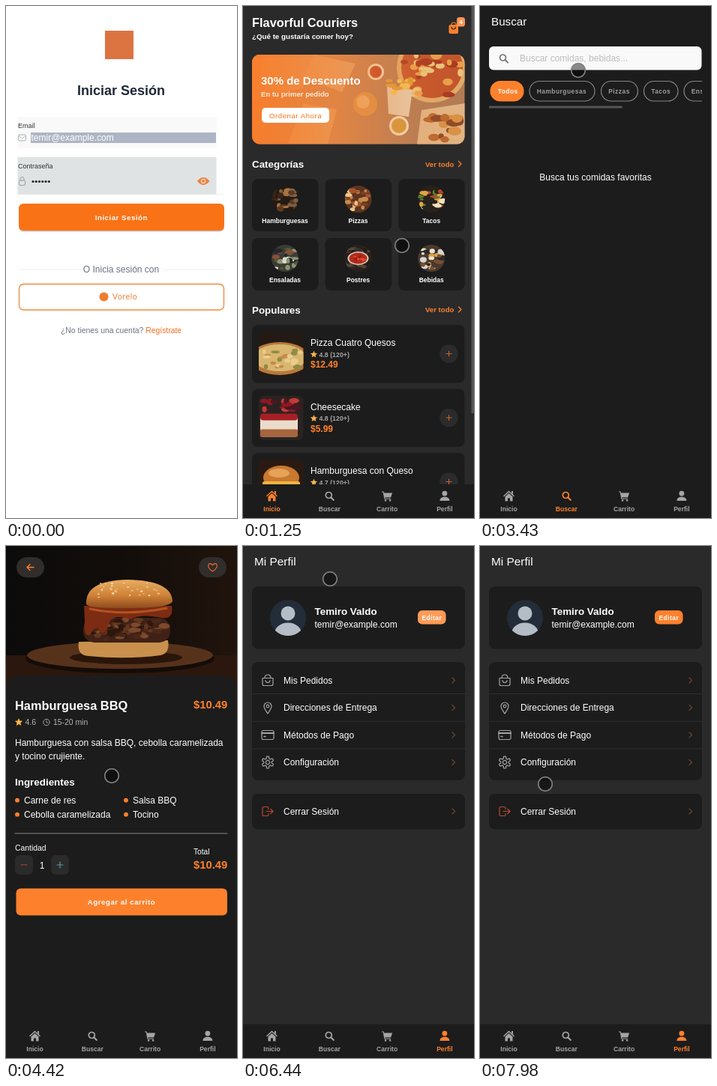
Write an HTML page that moves like this. It is 308 by 684 pixels and loops after 8000 ms.

```html
<!DOCTYPE html>
<html lang="es">
<head>
<meta charset="utf-8">
<title>Pedidos de comida</title>
<style>
  html, body { margin: 0; width: 100%; height: 100%; overflow: hidden; background: #fff; }
  svg { display: block; width: 100%; height: 100%; font-family: "Liberation Sans", Arial, sans-serif; }
  text { white-space: pre; }
</style>
</head>
<body>
<svg id="stage" viewBox="0 0 308 684"></svg>
<script>
const LOOP = 8000;
const ORANGE = '#fd812d', DARK = '#1c1c1c', PAGE = '#2a2a2a', MUTED = '#a5a5a5';
const BOLD = 'font-weight="700"', MID = 'text-anchor="middle"';
const EMAIL = 'temir@example.com';

// ---- drawing helpers ----
const text = (x, y, size, str, fill = '#fff', attrs = '') =>
  `<text x="${x}" y="${y}" font-size="${size}" fill="${fill}" ${attrs}>${str}</text>`;
const spaced = n => `letter-spacing="${n}"`;
const rect = (x, y, w, h, r, fill, attrs = '') =>
  `<rect x="${x}" y="${y}" width="${w}" height="${h}" rx="${r}" fill="${fill}" ${attrs}/>`;
const circle = (x, y, r, fill, attrs = '') => `<circle cx="${x}" cy="${y}" r="${r}" fill="${fill}" ${attrs}/>`;
const ellipse = (x, y, rx, ry, fill) => `<ellipse cx="${x}" cy="${y}" rx="${rx}" ry="${ry}" fill="${fill}"/>`;
const fillPath = (d, fill) => `<path d="${d}" fill="${fill}"/>`;
const line = (d, color, w = 1.2) =>
  `<path d="${d}" fill="none" stroke="${color}" stroke-width="${w}" stroke-linecap="round" stroke-linejoin="round"/>`;
const at = (x, y, body) => `<g transform="translate(${x} ${y})">${body}</g>`;
const chevron = (x, y, color) => line(`M${x - 2} ${y - 3.5}l3.5 3.5-3.5 3.5`, color);
const star = (x, y, r) => {
  const points = Array.from({ length: 10 }, (_, i) => {
    const a = i * Math.PI / 5, d = i % 2 ? r * .45 : r;
    return `${(x + d * Math.sin(a)).toFixed(1)},${(y - d * Math.cos(a)).toFixed(1)}`;
  });
  return `<polygon points="${points.join(' ')}" fill="#ffb347"/>`;
};

let clips = 0;
const clipped = (x, y, w, h, r, body) => {
  const id = `clip${clips++}`;
  return `<clipPath id="${id}">${rect(x, y, w, h, r, '#000')}</clipPath><g clip-path="url(#${id})">${body}</g>`;
};
const random = seed => () => (seed = (seed * 16807) % 2147483647) / 2147483647;
const blobs = (x, y, w, h, count, size, colors, seed) => {
  const rnd = random(seed * 7919);
  rnd();
  return Array.from({ length: count }, (_, i) =>
    ellipse(x + rnd() * w, y + rnd() * h, size * (.5 + rnd()), size * (.3 + rnd() * .6), colors[i % colors.length])).join('');
};

// ---- icons, centred on 0,0 ----
const magnifier = c => circle(-1, -1, 4, 'none', `stroke="${c}" stroke-width="1.7"`) + line('M2 2L5.5 5.5', c, 2);
const icons = {
  home: c => fillPath('M-7.5 0L0-7 7.5 0 6.5 1 0-5-6.5 1ZM-5 1L0-3.5 5 1V7H1.5V3H-1.5V7H-5ZM3.5-6.5H5.5V-2L3.5-4Z', c),
  search: magnifier,
  cart: c => fillPath('M-7-6H-4.5L-4-4H7L5 2H-3L-2.7 3.3H5V4.3H-3.7L-5.4-5H-7Z', c) + circle(-2, 6, 1.3, c) + circle(4, 6, 1.3, c),
  person: c => circle(0, -3.3, 3.4, c) + fillPath('M-6.5 6.5C-6.5-.5 6.5-.5 6.5 6.5Z', c),
  bag: c => line('M-7-3H7V5Q7 7 5 7H-5Q-7 7-7 5ZM-4-3C-4-9 4-9 4-3M-3 0C-3 4 3 4 3 0', c),
  pin: c => line('M0 8C-3 3-5 1-5-2A5 5 0 0 1 5-2C5 1 3 3 0 8Z', c) + circle(0, -2, 1.8, 'none', `stroke="${c}" stroke-width="1.2"`),
  card: c => rect(-8, -6, 16, 12, 2, 'none', `stroke="${c}" stroke-width="1.2"`) + line('M-8-2.5H8', c, 2) + line('M-5 2H-3', c, 1.6),
  gear: c => {
    const points = Array.from({ length: 64 }, (_, i) => {
      const a = i * Math.PI / 32, r = 6.6 + 1.4 * Math.tanh(3 * Math.cos(a * 6));
      return `${(r * Math.sin(a)).toFixed(1)} ${(r * Math.cos(a)).toFixed(1)}`;
    });
    return line(`M${points.join('L')}Z`, c) + circle(0, 0, 2.6, 'none', `stroke="${c}" stroke-width="1.2"`);
  },
  exit: c => line('M1-3V-4.5Q1-6 -.5-6H-5.5Q-7-6-7-4.5V4.5Q-7 6-5.5 6H-.5Q1 6 1 4.5V3M-2 0H7M4-3L7 0 4 3', c)
};

const tabs = [['home', 'Inicio'], ['search', 'Buscar'], ['cart', 'Carrito'], ['person', 'Perfil']];
const tabX = i => 38.5 + i * 76.8;
const tabBar = active => rect(0, 639, 308, 45, 0, DARK) + tabs.map(([icon, label], i) => {
  const color = i === active ? ORANGE : MUTED;
  return at(tabX(i), 654.5, icons[icon](color)) + text(tabX(i), 674.5, 8.6, label, color, `${BOLD} ${MID}`);
}).join('');

// ---- food pictures ----
const cake = (x, y) => rect(x, y, 60, 60, 0, '#2a2322') + rect(x + 2, y + 27, 50, 28, 3, '#eadccb') +
  rect(x + 2, y + 45, 50, 10, 2, '#a8643c') + rect(x + 2, y + 24, 50, 9, 4, '#a51f25') +
  blobs(x + 4, y + 5, 46, 18, 16, 5, ['#8e1822', '#c33b35', '#4b1720'], 5);
const pizza = (x, y) => rect(x, y, 60, 60, 0, '#241a15') + ellipse(x + 28, y + 36, 40, 22, '#b8793c') +
  ellipse(x + 28, y + 35, 35, 18, '#d9b66f') + blobs(x, y + 20, 56, 30, 22, 4, ['#e8cd8c', '#c58a49', '#8f8b45'], 9);
const burger = (x, y) => rect(x, y, 60, 60, 0, '#2b1a12') + ellipse(x + 30, y + 24, 24, 16, '#c9782f') +
  ellipse(x + 27, y + 18, 14, 6, '#e6a358') + rect(x + 5, y + 29, 50, 6, 3, '#f0b541') +
  rect(x + 5, y + 34, 50, 10, 4, '#4a2415') + rect(x + 7, y + 43, 46, 12, 5, '#bd7a38');

const foodCard = (y, picture, name, rating, price) =>
  rect(12, y, 283.5, 77.5, 8, DARK) + clipped(21, y + 9, 59.5, 59.5, 7, picture(21, y + 9)) +
  text(90, y + 28, 12, name) + star(94.5, y + 39.5, 5) +
  text(101.5, y + 42.5, 8.8, `${rating} (120+)`, MUTED, BOLD) + text(90, y + 57, 12, price, ORANGE, BOLD) +
  circle(274.5, y + 38.5, 12.3, '#2b2b2b') + line(`M271 ${y + 38.5}h7m-3.5-3.5v7`, '#c5672b', 1);

const category = ([name, ground, colors], i) => {
  const x = 12 + (i % 3) * 97.6, y = 231 + Math.floor(i / 3) * 79, cx = x + 44;
  return rect(x, y, 88.5, 70, 8, DARK) +
    clipped(cx - 18, y + 9, 36, 36, 18, rect(cx - 18, y + 9, 36, 36, 0, ground) +
      blobs(cx - 16, y + 14, 32, 27, 26, 4.2, colors, i + 3)) +
    text(cx, y + 59, 8.5, name, '#fff', `${BOLD} ${MID}`);
};

const heroPicture = () => rect(12, 65, 284, 120, 0, '#b27b55') +
  fillPath('M12 65H100L80 110 12 125Z', '#c99a6c') + fillPath('M95 65l55 12-18 38-52-20Z', '#d7a878') +
  fillPath('M80 130l45 8-12 46H60Z', '#d5a26c') +
  circle(252, 82, 47, '#dfab68') + circle(252, 82, 41, '#c2542b') +
  blobs(215, 65, 75, 55, 30, 6, ['#e7a04b', '#a63820', '#e9c67c'], 12) +
  fillPath('M192 108l34 4-5 36-27-4Z', '#e3ceb0') + blobs(193, 98, 32, 18, 14, 5, ['#f1c553', '#dc9c35'], 4) +
  circle(177, 88, 11, '#f2e3c7') + circle(177, 88, 8, '#b53a21') +
  circle(208, 160, 13, '#efe0c5') + circle(208, 160, 10, '#cf9a3c') +
  circle(163, 131, 16, '#d39146') + circle(160, 128, 9, '#e7b573') +
  fillPath('M238 139l58-9v55H232Z', '#e0b483') + blobs(245, 145, 45, 34, 16, 7, ['#ba672f', '#d89145', '#8d4926'], 8);

// ---- pages ----
const loginPage = () => rect(0, 0, 308, 684, 0, '#fff') +
  rect(132, 33, 38, 38, 0, '#dc7442') +
  text(153.5, 118.5, 18, 'Iniciar Sesión', '#1f2937', `${BOLD} ${MID}`) +
  rect(15.5, 148, 265.5, 42, 0, '#f9f9f9') + text(16, 163, 9, 'Email', '#333') +
  rect(16.5, 172, 10, 8, 1.5, 'none', 'stroke="#a9adb3"') + line('M17.5 174l4 3 4-3', '#a9adb3', .9) +
  rect(33, 169, 247, 14, 0, '#adb5c5') + text(33.5, 180, 12, EMAIL) +
  rect(15.5, 202, 265, 50, 0, '#f9f9f9') + rect(15.5, 202, 265, 50, 0, '#e0e3e3', 'id="fieldTint"') +
  line('M16 251.5H291', '#e8e8e8', .7) + text(16, 217, 9, 'Contraseña', '#333') +
  rect(17.5, 233, 8, 6.5, 1.5, 'none', 'stroke="#999da3"') + line('M19 233v-2a2.5 2.5 0 0 1 5 0v2', '#999da3', 1) +
  [0, 1, 2, 3, 4, 5].map(i => circle(36 + i * 4.25, 234.5, 1.6, '#222')).join('') +
  fillPath('M255 234Q263 224 271.500 234 263 244 255 234Z', '#f08138') +
  circle(263, 234, 3.2, '#e1e4e4') + circle(263, 234, 2, '#f08138') +
  rect(17, 265.5, 274, 36, 6, '#b9a89c', 'opacity=".7"') + rect(17, 264, 274, 36, 6, '#f97316') +
  text(153.8, 285.5, 9.6, 'Iniciar Sesión', '#fff', `${BOLD} ${MID} ${spaced(.55)}`) +
  line('M16 352H98M209 352H291', '#ececec', .8) + text(153.5, 355.5, 12, 'O Inicia sesión con', '#6b7280', MID) +
  rect(17.5, 371.5, 273, 34.5, 6, '#fff', 'stroke="#ef8a3e" stroke-width="1.3"') +
  circle(130.5, 388.5, 6, '#ef7b2c') + text(142, 391.5, 10.4, 'Vorelo', '#ef7b2c', spaced(.6)) +
  text(73, 437, 10.4, '¿No tienes una cuenta? <tspan fill="#f07020">Regístrate</tspan>', '#6b7280');

const sectionHead = (y, title) => text(12, y, 13.4, title, '#fff', BOLD) +
  text(243, y - 1.5, 9.6, 'Ver todo', ORANGE, BOLD) + chevron(289.5, y - 5, ORANGE);

const homePage = () => rect(0, 0, 308, 684, 0, PAGE) +
  text(12, 27.5, 16.4, 'Flavorful Couriers', '#fff', BOLD) +
  text(12, 44, 9.75, '¿Qué te gustaría comer hoy?', '#fff', BOLD) +
  rect(274.5, 25, 12.5, 12, 2, ORANGE) + line('M278 25c0-4 6-4 6 0', ORANGE) + line('M278 28c0 4 5.500 4 5.500 0', PAGE) +
  rect(285, 15, 11, 12.5, 3.5, '#ff9452') + text(290.5, 24, 8, '4', '#fff', `${BOLD} ${MID}`) +
  clipped(12, 65, 283.5, 119.5, 10, heroPicture() + rect(12, 65, 284, 120, 0, 'url(#heroTint)')) +
  text(24, 105, 15, '30% de Descuento', '#fff', BOLD) + text(24, 120.5, 9.6, 'En tu primer pedido', '#ffe9d8', BOLD) +
  rect(25, 136, 90, 20, 5, '#fff') + text(35, 149.5, 9.6, 'Ordenar Ahora', '#f97316', spaced(.55)) +
  sectionHead(216, 'Categorías') +
  [['Hamburguesas', '#241a14', ['#5c3a20', '#3a2417', '#a87442', '#7c6146']],
   ['Pizzas', '#5b3420', ['#c98a4c', '#7b4023', '#ecc88d', '#a5532c']],
   ['Tacos', '#27221c', ['#e0a644', '#f0e2bd', '#5d7a35', '#b64529', '#2a2018']],
   ['Ensaladas', '#3b3b36', ['#8b9671', '#dcd9cc', '#4c5a38', '#8a4f38', '#25282a']],
   ['Postres', '#2a211d', ['#37302c', '#57463a', '#221b18']],
   ['Bebidas', '#4a3a2e', ['#f0e4cf', '#d6a04a', '#7a4f30', '#d5d5d2', '#2d2826']]].map(category).join('') +
  ellipse(153.5, 337, 14, 9, '#d9cfc4') + ellipse(153.5, 337, 12, 7.500, '#b52a1a') +
  blobs(145, 333, 17, 8, 9, 2, ['#e0502c', '#8d1c14'], 6) +
  sectionHead(410.5, 'Populares') +
  foodCard(426, pizza, 'Pizza Cuatro Quesos', '4.8', '$12.49') +
  foodCard(511.500, cake, 'Cheesecake', '4.8', '$5.99') +
  foodCard(597, burger, 'Hamburguesa con Queso', '4.7', '$8.99') +
  rect(304.5, 0, 3.5, 544, 0, '#565656') + tabBar(0);

const chips = [['Todos', 14, 44], ['Hamburguesas', 66, 87], ['Pizzas', 161.500, 49], ['Tacos', 218.5, 45.5], ['Ensaladas', 272, 70]];
const searchPage = active => rect(0, 0, 308, 684, 0, DARK) + text(15, 26, 15.2, 'Buscar') +
  rect(12, 54, 283.5, 31.5, 6, '#f9f9f9') + at(31.5, 70, magnifier('#777')) +
  text(53, 74, 12, 'Buscar comidas, bebidas...', '#bcbcbc') +
  clipped(12, 95, 284, 36, 0, chips.map(([name, x, w], i) =>
    rect(x, 100.5, w, 26.5, 13.2, i === active ? ORANGE : 'none', `stroke="${i === active ? ORANGE : '#858585'}" stroke-width="1.2"`) +
    text(x + 9.7, 117, 8.4, name, i === active ? '#fff' : '#9c9c9c', `${BOLD} ${spaced(.5)}`)).join('')) +
  rect(12, 133.5, 177.5, 3, 0, '#555') +
  (active ? foodCard(150, burger, 'Hamburguesa con Queso', '4.7', '$8.99') + foodCard(236, burger, 'Hamburguesa BBQ', '4.6', '$10.49')
          : text(154, 233, 12, 'Busca tus comidas favoritas', '#fff', MID)) + tabBar(1);

const burgerPhoto = () => rect(0, 0, 308, 190, 0, 'url(#photoDusk)') +
  rect(0, 146, 308, 44, 0, '#2b170d') + ellipse(152, 150, 126, 20, '#140c08') + ellipse(152, 146, 124, 18, '#57321b') +
  ellipse(160, 149, 75, 9, '#2a150a') +
  fillPath('M97 128Q94 146 110 147Q160 152 206 146Q219 143 216 126Z', '#c9904d') +
  rect(103, 96, 116, 33, 15, '#3f2116') + blobs(108, 98, 104, 27, 60, 5, ['#63361f', '#2d160e', '#7c4a2b', '#4a2718'], 21) +
  fillPath('M104 80H221Q224 98 208 96Q180 90 165 98Q145 91 138 101Q133 120 126 116Q121 101 112 119Q103 122 105 100Z', '#7c2c12') +
  line('M112 84Q160 94 214 83', '#b45220', 3) +
  fillPath('M107 78Q105 46 162 45Q221 46 222 74Q218 83 163 83Q112 84 107 78Z', 'url(#bun)') +
  blobs(122, 49, 82, 20, 30, 1.5, ['#f6dda9', '#e9c07a'], 15);

const pill = x => rect(x, 15, 37, 27, 13.5, '#302d2b');
const detailPage = () => rect(0, 0, 308, 684, 0, DARK) + burgerPhoto() +
  pill(14) + line('M37 28.5H28M32 24.5l-4 4 4 4', ORANGE, 1.4) + pill(257) +
  line('M275.500 34C265 27 271 20 275.500 25.500C280 20 286 27 275.500 34Z', '#d8612c', 1.3) +
  rect(0, 173, 308, 60, 18, DARK) + rect(0, 210, 308, 430, 0, DARK) +
  text(12, 219, 16.4, 'Hamburguesa BBQ', '#fff', BOLD) + text(250, 217, 14.8, '$10.49', ORANGE, BOLD) +
  star(17, 235.5, 5.5) + text(25.5, 239, 10.5, '4.6', '#b5b5b5') +
  circle(54, 235.5, 4.2, 'none', 'stroke="#a5a5a5"') + line('M54 233v3h2', MUTED, .9) +
  text(63, 239, 10.4, '15-20 min', '#b5b5b5') +
  text(12, 267, 12, 'Hamburguesa con salsa BBQ, cebolla caramelizada') + text(12, 285, 12, 'y tocino crujiente.') +
  text(12, 319.5, 13.4, 'Ingredientes', '#fff', BOLD) +
  ['Carne de res', 'Salsa BBQ', 'Cebolla caramelizada', 'Tocino'].map((name, i) => {
    const x = i % 2 ? 157 : 12, y = i < 2 ? 344 : 363;
    return circle(x + 3, y - 4.3, 2.9, ORANGE) + text(x + 12, y, 12, name);
  }).join('') +
  line('M12 384H295', '#858585', 1) + text(12, 407, 10.4, 'Cantidad') +
  rect(12, 413, 24, 26, 6, '#2b2b2b') + line('M20 426h8', '#b04a35') +
  rect(60, 413, 24, 26, 6, '#2b2b2b') + line('M68 426h8m-4-4v8', '#5d9aa0') +
  text(48, 430.5, 12, '1', '#fff', MID) + text(250, 411.5, 10.2, 'Total') + text(250, 431, 14.8, '$10.49', ORANGE, BOLD) +
  rect(13.5, 457.5, 281.5, 36, 6, ORANGE) +
  text(154, 478.5, 9.6, 'Agregar al carrito', '#fff', `${BOLD} ${MID} ${spaced(.58)}`) + tabBar(-1);

const menuRow = (y, icon, label, color = MUTED) =>
  at(33, y, icons[icon](color)) + text(54, y + 4, 12, label) + chevron(281, y, '#6b452f');
const profilePage = () => rect(0, 0, 308, 684, 0, PAGE) + text(15, 26, 15.4, 'Mi Perfil') +
  rect(12, 54, 284, 83.5, 8, DARK) +
  clipped(36, 72, 48, 48, 24, rect(36, 72, 48, 48, 0, '#232d39') + circle(60, 90, 9.5, '#b4bdc5') + ellipse(60, 117, 18, 14.5, '#b4bdc5')) +
  text(95.5, 92, 13.4, 'Temiro Valdo', '#fff', BOLD) + text(95.5, 109, 12, EMAIL) +
  rect(233, 86, 37.5, 18.5, 6, ORANGE) + rect(233, 86, 37.5, 18.5, 6, '#fff', 'id="editGlow" opacity="0"') +
  text(251.8, 98.5, 8.4, 'Editar', '#fff', `${BOLD} ${MID} ${spaced(.5)}`) +
  rect(12, 155, 284, 158, 8, DARK) + line('M12 197.5H296M12 234.300H296M12 271H296', '#2e2e2e', 1) +
  menuRow(179.5, 'bag', 'Mis Pedidos') + menuRow(216, 'pin', 'Direcciones de Entrega') +
  menuRow(252.5, 'card', 'Métodos de Pago') + menuRow(289, 'gear', 'Configuración') +
  rect(12, 331, 284, 47.5, 8, DARK) + menuRow(354.5, 'exit', 'Cerrar Sesión', '#b94a30') + tabBar(3);

// ---- scene ----
const pages = [
  { start: 0, enter: 0, body: loginPage() },
  { start: 1190, enter: 60, body: homePage() },
  { start: 1980, enter: 0, body: searchPage(0) },
  { start: 3580, enter: 0, body: searchPage(1) },
  { start: 4190, enter: 180, body: detailPage() },
  { start: 5210, enter: 0, body: profilePage() }
];
const gradient = (id, dir, stops) => `<linearGradient id="${id}" ${dir}>${stops.map(([offset, color, opacity = 1]) =>
  `<stop offset="${offset}" stop-color="${color}" stop-opacity="${opacity}"/>`).join('')}</linearGradient>`;
const stage = document.getElementById('stage');
stage.innerHTML = '<defs>' +
  gradient('heroTint', '', [[0, '#fb7d28', .95], [.4, '#f98a3c', .65], [.8, '#f98a3c', .1], [1, '#f98a3c', 0]]) +
  gradient('photoDusk', '', [[0, '#0c0b0b'], [.5, '#120d0a'], [1, '#21140d']]) +
  gradient('bun', 'x2="0" y2="1"', [[0, '#e8ad62'], [.55, '#cf8238'], [1, '#8d4a1c']]) + '</defs>' +
  pages.map(p => `<g class="page">${p.body}</g>`).join('') +
  clipped(0, 638.5, 308, 46, 0, circle(0, 661, 30, ORANGE, 'id="ripple"')) +
  circle(0, 0, 9.3, '#000', 'id="cursor" fill-opacity=".45" stroke="#808080" stroke-width="1.7"');

const pageNodes = [...document.querySelectorAll('.page')];
const [ripple, cursor, fieldTint, editGlow] =
  ['ripple', 'cursor', 'fieldTint', 'editGlow'].map(id => document.getElementById(id));

const cursorPath = [ // time, x, y
  [1190, 212, 320], [1300, 212, 320], [1780, 120, 640], [1980, 108, 678], [2250, 108, 678], [2760, 125, 110],
  [3430, 131, 86], [3560, 112, 114], [3700, 112, 114], [4010, 141, 307], [4560, 141, 307], [4970, 220, 500],
  [5210, 269, 660], [5420, 269, 660], [6000, 251, 96], [6120, 251, 96], [6440, 116, 44], [6930, 116, 44],
  [7760, 88, 343], [7979.9, 88, 343], [7980, 87, 318], [LOOP, 87, 318]
];
const progress = (t, from, to) => to > from ? Math.min(1, Math.max(0, (t - from) / (to - from))) : +(t >= from);
const smooth = k => k * k * (3 - 2 * k);

function draw(t) {
  const current = pages.findLastIndex(p => t >= p.start);
  pages.forEach((p, i) => {
    const k = smooth(progress(t, p.start, p.start + p.enter));
    const under = i === current - 1 && t < pages[current].start + pages[current].enter;
    pageNodes[i].style.display = i === current || under ? '' : 'none';
    pageNodes[i].setAttribute('opacity', k);
    pageNodes[i].setAttribute('transform', `translate(0 ${p.enter ? 32 * (1 - k) : 0})`);
  });

  fieldTint.setAttribute('opacity', 1 - progress(t, 80, 630));
  editGlow.setAttribute('opacity', .2 * progress(t, 6000, 6060) * (1 - progress(t, 6440, 6800)));

  const tap = t >= 5210 ? 5210 : 1980;
  ripple.setAttribute('cx', tabX(tap === 5210 ? 3 : 1));
  ripple.setAttribute('r', 12 + 18 * smooth(progress(t, tap, tap + 90)));
  ripple.setAttribute('opacity', t < tap ? 0 : .16 * (1 - progress(t, tap + 130, tap + 430)));

  cursor.style.display = t < cursorPath[0][0] ? 'none' : '';
  const next = cursorPath.findIndex(p => p[0] > t);
  if (next > 0) {
    const [t0, x0, y0] = cursorPath[next - 1], [t1, x1, y1] = cursorPath[next];
    const k = smooth(progress(t, t0, t1));
    cursor.setAttribute('cx', x0 + (x1 - x0) * k);
    cursor.setAttribute('cy', y0 + (y1 - y0) * k);
  }
}

const began = performance.now();
function tick() {
  draw((performance.now() - began) % LOOP);
  requestAnimationFrame(tick);
}
tick();
</script>
</body>
</html>
```
